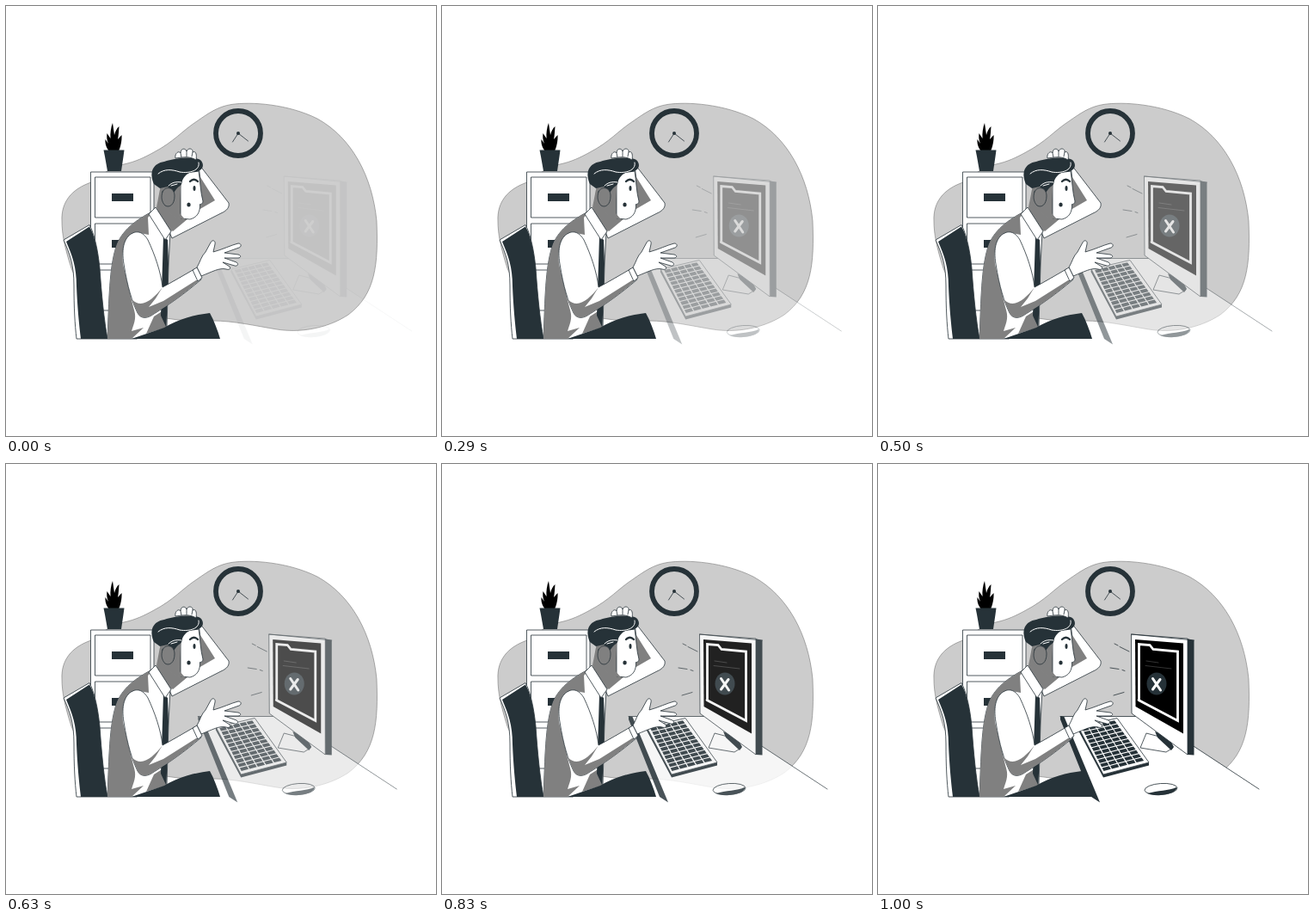
These frames come from a looping animation (500 by 500 pixels, 1040 ms). An HTML page:

```html
<!DOCTYPE html>
<html lang="en">
<head>
<meta charset="utf-8">
<title>Computer trouble</title>
<style>
  html, body { margin: 0; height: 100%; overflow: hidden; background: #fff; }
  svg { display: block; width: 100vw; height: 100vh; }
  .ink { fill: #263238; }
  .shade { fill: #808080; }
  .line { fill: #fff; stroke: #263238; stroke-width: .8; stroke-linejoin: round; }
  .pen { fill: none; stroke: #263238; stroke-width: .8; stroke-linecap: round; }
  .chalk { fill: none; stroke: #fff; stroke-linecap: round; }
</style>
</head>
<body>
<svg viewBox="0 0 500 500">
  <path fill="#ccc" stroke="#777" stroke-width=".6" d="M65 250C64 228 76 213 99 205C112 195 124 187 137 184C151 181 161 176 172 170C195 158 205 145 222 134C235 125 246 117 262 114.500C285 111 328 114 362 131C402 153 426 198 431 250C433 300 430 335 398 359C372 376 340 380 315 376C290 372 265 366 240 366C180 370 90 345 76 305C68 280 65 265 65 250Z"/>

  <g id="clock">
    <circle cx="270" cy="148" r="26" fill="none" stroke="#263238" stroke-width="5.8"/>
    <path class="pen" d="M263.500 158L270 148L281.500 157"/>
    <circle class="ink" cx="270" cy="148" r="2"/>
  </g>

  <g id="cabinet">
    <path class="line" d="M98.500 193H172V386H98.500Z"/>
    <g id="drawers"></g>
    <path d="M120 169C117 165 115 161 115.500 155L119 160C117 156 117 151 117.500 148L121.500 154C121 148 122 141 124 136L126 150C127 146 129 142 131.500 140C131 146 131 150 130 155L134.500 150C135 157 133 164 131 169Z"/>
    <path class="ink" d="M113.500 167.500H137.500L136.500 175L134 192H118L115 175Z"/>
  </g>

  <g id="chair">
    <path class="line" d="M67 272L97 254.500C103 265 107 285 109 305C111 335 114 365 118 387H82C80 370 79 350 79 325C79 300 74 288 67 272Z"/>
    <path class="ink" d="M70 274L97 256.500C103 266 107 285 109 305C111 335 114 365 118 387H87C85 370 83 350 82 326C82 303 77 290 70 274Z"/>
  </g>

  <g id="desk">
    <path fill="#fff" d="M212 293.500H300L366 327.500L443 378L258 393.500Z"/>
    <path class="pen" d="M212 293.500H300M366 327.500L443 378"/>
    <path class="ink" d="M212 293L216.500 294L258 393.500L248 387L212 297Z"/>

    <path class="line" d="M312 313L305 330L335 335L343 330L331 318Z"/>
    <path class="ink" d="M322 311L338 318L344 329L341 333L325 318Z"/>
    <path class="ink" d="M359 203L367.500 205V338.500L360 338Z"/>
    <path class="line" d="M294.500 198L360 203V338L295 290Z"/>
    <path class="pen" d="M294.500 198L367.500 205"/>
    <path d="M299 204L355 208.500V313.500L299.500 282Z"/>
    <path class="chalk" stroke-width="2.800" stroke-linecap="butt" d="M303.500 274V209.500L316 210.500L320 215.500L348.500 218V298.500L303 274.500"/>
    <path class="chalk" style="stroke:#333" d="M312 229L326 231M311 234.500L341 238"/>
    <ellipse class="ink" cx="324" cy="255.500" rx="11.500" ry="13"/>
    <path class="chalk" stroke-width="3" d="M319.500 249.500L328.500 263M328 250.500L319.500 262"/>

    <path class="ink" d="M233 306L262 361L315 347V350.500L262 364.500L232.500 309Z"/>
    <path class="line" d="M233 306L278 295.500L315 347L262 361Z"/>
    <path id="keys" class="ink"/>

    <g transform="rotate(-4 329 378)">
      <ellipse class="line" cx="329" cy="378" rx="19" ry="6.500"/>
      <path class="ink" d="M313 382C325 379 338 381 347.500 377C347 386 321 387 313 382Z"/>
    </g>
    <path class="pen" d="M275 209L279 211M281 212.500L292 218M270 237L280 238.500M284 239.500L287 240.500M274 269L286 265.500"/>
  </g>

  <g id="man">
    <path class="line" d="M224 184L229 190L259 229C260 234 257 238 250 241L193 270L188 258L205 247L240 226L226 203Z"/>
    <path class="shade" d="M226 199L243 226L224 237L194 262L188 256L206 246Z"/>

    <path class="line" d="M172 238C150 249 134 262 128 280C120 305 120 340 118 387H152L187 374L189 300L191 262L180 240Z"/>
    <path class="shade" d="M172 238C150 249 134 262 128 280C120 305 120 340 118 387H146L160 374L146 378C150 366 152 362 148 350L136 300C134 280 140 268 150 263L166 266L165 246Z"/>
    <path class="shade" d="M172 361L186 352V374L163 381Z"/>
    <path class="ink" d="M183 268L188 272L189 300L186.500 374L180 360L182 300Z"/>
    <path class="ink" d="M146 387L184 374C200 364 220 359 237 357C242 366 246 377 249 387Z"/>

    <path class="shade" d="M175 234L180 208H210V248L192 262L178 242Z"/>
    <path class="line" d="M174 234L192 262L185 272L166 242Z"/>

    <path class="line" d="M203 195L224 192C226 204 226 216 229 227C229 230 227 230.500 225.500 230.500C226 240 222 246 214 248L203 247Z"/>
    <path class="shade" d="M180 206L205 197L203 212L201 240L208 248C198 248 185 238 181 228Z"/>
    <path class="ink" d="M172 207C166 193 171 183 184 181C196 177 221 174 227 180C232 187 227 193 217 193C211 194 207 198 205 203C205 209 201 209 198 213L195 217L188 210L179 212Z"/>
    <path class="pen" style="fill:#808080" d="M182 216C185 209 196 210 196 221C196 231 190 235 185 232C181 228 180 222 182 216Z"/>
    <path class="chalk" d="M177 195C184 189 193 190 202 193C214 195 226 191 224 182M189 209C193 205 198 204 204 205M192 209L199 207"/>
    <path class="pen" style="stroke-width:2.400" d="M214 204C217 201 220 201 223 204"/>
    <ellipse class="ink" cx="219" cy="212" rx="1.500" ry="3"/>
    <ellipse class="ink" cx="212.500" cy="231" rx="2.200" ry="2.600"/>
    <path class="line" d="M197 177C196 171 201 168 203 171C203 165 209 165 210 169C212 164 218 166 217 170C221 168 222 173 221 179C213 174 205 176 197 177Z"/>
    <path class="pen" d="M203 171L204 176M210 169V175M217 170L216 175"/>

    <path class="line" d="M150 263C137 267 134 282 137 300C141 326 147 345 153 357C157 364 164 364 172 358C190 347 207 335 227 318L219 306C205 314 195 320 182 327C180 309 173 289 165 272C161 265 156 262 150 263Z"/>
    <path class="shade" d="M182 327L174 340L166 350L183 343L221 319L225 319C207 335 190 347 172 358C165 363 158 364 154 359L146 341C158 353 171 341 182 327Z"/>
    <path class="line" d="M222 304C226 297 227 291 232 286L238 275C240 271 244 273 243 277L241 286C252 283 262 278 270 276C274 276 274 280 271 281L254 287L270 289C274 290 273 293 270 293L254 293L268 298C271 300 269 303 266 302L252 298L260 303C262 306 259 307 256 306C248 304 240 309 227 314Z"/>
    <path class="line" d="M217 307L222 304L228 316L223 320Z"/>
  </g>
</svg>
<script>
  const byId = id => document.getElementById(id);

  byId('drawers').innerHTML = [199, 253, 307].map(y =>
    `<path class="line" d="M103.500 ${y}H168V${y + 47}H103.500Z"/>
     <path class="ink" d="M123 ${y + 19}H148V${y + 28}H123Z"/>`).join('');

  // A point on the key field: u runs across, v towards the viewer.
  const mix = (a, b, k) => a + (b - a) * k;
  const at = (u, v) =>
    mix(mix(237, 276, u), mix(263, 311, u), v).toFixed(1) + ' ' +
    mix(mix(307, 298, u), mix(358, 345.5, u), v).toFixed(1);

  const cols = 5, rows = 11;
  let keys = '';
  for (let r = 0; r < rows; r++) {
    for (let c = 0; c < cols; c++) {
      const u = c / cols, v = r / rows, u2 = (c + .87) / cols, v2 = (r + .78) / rows;
      keys += `M${at(u, v)}L${at(u2, v)}L${at(u2, v2)}L${at(u, v2)}Z`;
    }
  }
  byId('keys').setAttribute('d', keys);

  // The desk slides in and fades up at 24 steps a second.
  const LOOP = 1040, STEP = 1000 / 24, SLIDE = 30;
  const desk = byId('desk');
  function draw() {
    const t = performance.now() % LOOP;
    const step = Math.min(24, Math.max(1, Math.floor((t + 4) / STEP)));
    const p = step / 24;
    desk.setAttribute('opacity', p);
    desk.setAttribute('transform', `translate(${SLIDE * (1 - p)} 0)`);
    requestAnimationFrame(draw);
  }
  draw();
</script>
</body>
</html>
```
